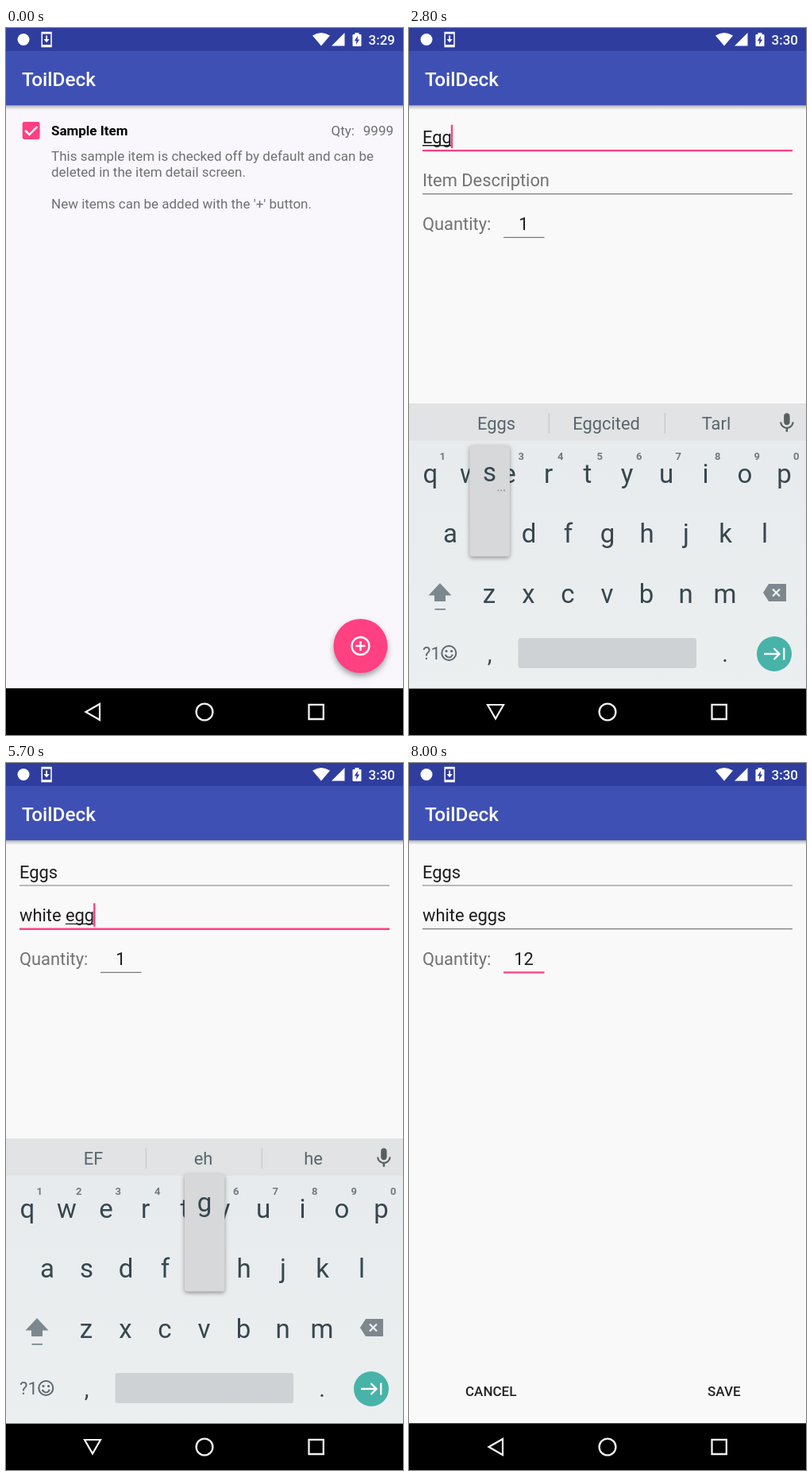
Animation of 500x889 px, one loop 8200 ms. Source, as an HTML page with a canvas:

```html
<!DOCTYPE html>
<html lang="en">
<head>
<meta charset="utf-8">
<title>Add an item</title>
<style>
  html, body { margin: 0; width: 100%; height: 100%; overflow: hidden; background: #000; }
  canvas { display: block; width: 100vw; height: 100vh; }
</style>
</head>
<body>
<canvas id="stage" width="500" height="889"></canvas>
<script>
const W = 500, H = 889, LOOP = 8200, STEP = 100;
const NAV_Y = 830.5, KEYS_Y = 472;
const PINK = '#ff4081', INK = '#37474f', MUTED = '#7c888e', TEAL = '#48b3a9';
const DP = 1.2153, BODY = 18 * DP, SMALL = 14 * DP;

const stage = document.getElementById('stage').getContext('2d');
const buffer = document.createElement('canvas');
buffer.width = W;
buffer.height = H;
const layer = buffer.getContext('2d');
let g = stage;

// Each key pops up at its time, commits 100 ms later and clears after 200 ms.
const HOLD = 100;
const NAME = { text: 'Eggs', at: [2100, 2300, 2500, 2800] };
const NOTE = { text: 'white eggs', at: [3700, 3900, 4100, 4300, 4600, 4900, 5100, 5400, 5600, 5900] };
const ROWS = [
  { keys: 'qwertyuiop', x: 27, y: 572 },
  { keys: 'asdfghjkl', x: 52, y: 647 },
  { keys: 'zxcvbnm', x: 101, y: 723 }
];
const GAP = 49.5;
const HINTS = [
  [0, 'the', 'I', 'thanks'],
  [2200, 'EF', 'Eh', 'He'],
  [2700, 'Eggs', 'Eggcited', 'Tarl'],
  [3400, 'the', 'I', 'thanks'],
  [3800, 'with', 'w', 'was'],
  [4000, 'what', 'why', 'who'],
  [4500, 'what', 'Whit', 'White'],
  [4800, 'White', 'white', 'whites'],
  [5000, 'house', 'and', 'wedding'],
  [5300, 'EF', 'eh', 'he'],
  [5800, 'Eggs', 'egg', 'eggs'],
  [6300, '', '', '']
];
const MIC = new Path2D('M12 14c1.66 0 3-1.34 3-3V5c0-1.66-1.34-3-3-3S9 3.34 9 5v6c0 1.66 1.34 3 3 3zm5.3-3c0 3-2.54 5.1-5.3 5.1S6.7 14 6.7 11H5c0 3.41 2.72 6.23 6 6.72V21h2v-3.28c3.28-.48 6-3.3 6-6.72h-1.7z');

const clamp = v => Math.max(0, Math.min(1, v));
const span = (t, a, b) => clamp((t - a) / (b - a));
const within = (t, a, b) => t >= a && t < b;
const typed = (field, t) => field.text.slice(0, field.at.filter(a => t >= a + HOLD).length);

function text(str, x, y, size, color, align = 'left', weight = 400) {
  g.font = `${weight} ${size}px Roboto, sans-serif`;
  g.textAlign = align;
  g.fillStyle = color;
  g.fillText(str, x, y);
  return g.measureText(str).width;
}

function rect(x, y, w, h, color, r = 0) {
  g.fillStyle = color;
  g.beginPath();
  g.roundRect(x, y, w, h, r);
  g.fill();
}

function disc(x, y, r, color) {
  g.fillStyle = color;
  g.beginPath();
  g.arc(x, y, r, 0, 7);
  g.fill();
}

function ring(x, y, r, color, width) {
  g.strokeStyle = color;
  g.lineWidth = width;
  g.beginPath();
  g.arc(x, y, r, 0, 7);
  g.stroke();
}

function trace(points, closed) {
  g.beginPath();
  for (let i = 0; i < points.length; i += 2) g.lineTo(points[i], points[i + 1]);
  if (closed) g.closePath();
}

function shape(points, color) {
  trace(points, true);
  g.fillStyle = color;
  g.fill();
}

function stroke(points, color, width, closed = false) {
  trace(points, closed);
  g.strokeStyle = color;
  g.lineWidth = width;
  g.stroke();
}

function shadowed(blur, dy, alpha, draw) {
  g.save();
  g.shadowColor = `rgba(0,0,0,${alpha})`;
  g.shadowBlur = blur;
  g.shadowOffsetY = dy;
  draw();
  g.restore();
}

function group(alpha, dy, draw) {
  layer.clearRect(0, 0, W, H);
  g = layer;
  draw();
  g = stage;
  g.globalAlpha = alpha;
  g.drawImage(buffer, 0, dy);
  g.globalAlpha = 1;
}

function statusBar(t) {
  const bar = '#2f3e9e';
  rect(0, 0, W, 29, bar);
  disc(22, 14.5, 7.5, '#fff');
  stroke([45.2, 5.5, 57, 5.5, 57, 23.5, 45.2, 23.5], '#fff', 1.5, true);
  rect(45, 5, 12, 2.5, '#fff');
  rect(45, 21, 12, 2.5, '#fff');
  rect(50.2, 9.5, 1.8, 5, '#fff');
  shape([47.5, 14, 54.7, 14, 51.1, 18.3], '#fff');

  g.fillStyle = '#fff';
  g.beginPath();
  g.moveTo(397, 22.5);
  g.lineTo(386, 9.5);
  g.quadraticCurveTo(397, 2.5, 408, 9.5);
  g.fill();
  shape([426.5, 6, 426.5, 22.5, 410, 22.5], '#fff');
  rect(436.5, 8, 11, 15, '#fff', 1);
  rect(439.5, 6, 5, 3, '#fff');
  shape([443.2, 9.5, 438.8, 16.2, 441.4, 16.2, 440.8, 21, 445.2, 14.4, 442.6, 14.4], bar);
  text(t < 500 ? '3:29' : '3:30', 490, 21, SMALL, '#fff', 'right', 500);
}

function appBar() {
  const fade = g.createLinearGradient(0, 97, 0, 103);
  fade.addColorStop(0, 'rgba(0,0,0,.28)');
  fade.addColorStop(1, 'rgba(0,0,0,0)');
  rect(0, 97, W, 6, fade);
  rect(0, 29, W, 68.2, '#3f50b5');
  text('ToilDeck', 20, 72.5, 20 * DP, '#fff', 'left', 500);
}

function listScreen(t) {
  const grey = '#6d7072';
  rect(0, 0, W, NAV_Y, '#f9f7fb');
  appBar();
  rect(20.7, 118, 21.9, 21.9, PINK, 2.4);
  stroke([24.2, 128.8, 29.4, 134, 39.4, 124], '#fff', 2.4);
  text('Sample Item', 57, 135, SMALL, '#000', 'left', 700);
  text('Qty:', 409.5, 135, SMALL, grey);
  text('9999', 488, 135, SMALL, grey, 'right');
  text('This sample item is checked off by default and can be', 57, 167, SMALL, grey);
  text('deleted in the item detail screen.', 57, 187, SMALL, grey);
  text("New items can be added with the '+' button.", 57, 226.5, SMALL, grey);

  const press = span(t, 0, 400);
  shadowed(7 + 5 * press, 4 + 2 * press, .36, () => disc(446.5, 777, 34, PINK));
  if (press) disc(446.5, 777, 34 * press, 'rgba(255,255,255,.22)');
  ring(446.5, 777, 11, '#fff', 2.4);
  stroke([440.5, 777, 452.5, 777], '#fff', 2.4);
  stroke([446.5, 771, 446.5, 783], '#fff', 2.4);
}

function underline(x, y, w, focused) {
  if (focused) rect(x, y - .6, w, 2.4, PINK);
  else rect(x, y - .1, w, 1.2, '#7b7b7b');
}

function field(value, hint, base, focused, composing) {
  underline(17, base + 8.8, 466, focused);
  const w = text(value || hint, 17, base, BODY, value ? '#1c1c1c' : '#727272');
  if (!focused) return;
  const end = value ? 17 + w : 17.5;
  const word = value.slice(value.lastIndexOf(' ') + 1);
  if (composing && word) rect(end - g.measureText(word).width, base + 2.4, g.measureText(word).width, 1.3, '#222');
  rect(end - 1, base - 23, 2.4, 29.5, PINK);
}

function formScreen(t) {
  rect(0, 0, W, NAV_Y, '#f9f9f9');
  appBar();
  field(typed(NAME, t), 'Item Name', 144.7, t < 3400, t < 3200);
  field(typed(NOTE, t), 'Item Description', 199.3, within(t, 3400, 6300), true);

  const active = t >= 6300, count = t < 7400 ? '1' : '12';
  text('Quantity:', 17, 254, BODY, '#727272');
  underline(119, 262.8, 51.5, active);
  const w = text(count, 144.5, 254, BODY, '#1c1c1c', 'center');
  if (active && t < 7900) rect(144.5 + w / 2 - .6, 231, 2.4, 31, PINK);
  if (active && t < 7400) {
    disc(151, 277, 12.2, PINK);
    shape([151, 262.5, 160.5, 270, 141.5, 270], PINK);
  }
  text('CANCEL', 71, 796, SMALL, '#222', 'left', 500);
  text('SAVE', 376, 796, SMALL, '#222', 'left', 500);
}

function backspace() {
  shape([446, 710, 453, 699, 475, 699, 475, 721, 453, 721], MUTED);
  stroke([458, 705.5, 467, 714.5], '#eceff0', 2.3);
  stroke([467, 705.5, 458, 714.5], '#eceff0', 2.3);
}

function letters(t) {
  const upper = within(t, 1900, 2200);
  for (const { keys, x, y } of ROWS)
    [...keys].forEach((k, i) => text(upper ? k.toUpperCase() : k, x + i * GAP, y, 33, INK, 'center'));
  for (let i = 0; i < 10; i++)
    text(String((i + 1) % 10), 42.3 + i * GAP, 542.5, 13, '#6f7b80', 'center', 700);

  const arrow = upper ? INK : MUTED;
  shape([39, 698, 53.5, 713.5, 46, 713.5, 46, 721, 32, 721, 32, 713.5, 24.5, 713.5], arrow);
  rect(32.5, 730, 13.5, 1.8, arrow);
  backspace();

  text('?1', 17, 794, 22, '#5c686e');
  ring(50.3, 786, 9, '#5c686e', 2);
  disc(47, 783.5, 1.6, '#5c686e');
  disc(53.6, 783.5, 1.6, '#5c686e');
  g.beginPath();
  g.arc(50.3, 786.5, 4.8, .3, Math.PI - .3);
  g.stroke();
  text(',', 101.5, 797, 29, INK, 'center');
  text('.', 398, 797, 29, INK, 'center');
  rect(137.5, 767, 224.5, 38, within(t, 4900, 5100) ? '#b9bfc2' : '#cfd2d4', 3);

  disc(460, 787, 22, within(t, 3200, 3400) ? '#35958c' : TEAL);
  stroke([447, 787, 466, 787], '#fff', 2.4);
  stroke([459.5, 780, 466.5, 787, 459.5, 794], '#fff', 2.4);
  rect(471, 779.5, 2.4, 15, '#fff');
}

function digits(t) {
  if (within(t, 7300, 7500)) rect(129, 528, 112, 68, '#d0d4d6', 3);
  '123456789'.split('').forEach((d, i) =>
    text(d, 68 + i % 3 * 117, 572 + Math.floor(i / 3) * 75.3, 33, INK, 'center'));
  text('0', 185, 797, 33, INK, 'center');
  text(',', 68, 797, 29, INK, 'center');
  text('.', 302, 797, 29, INK, 'center');
  text('-', 460, 570, 33, INK, 'center');
  stroke([450, 632, 450, 639, 470, 639, 470, 632], MUTED, 2.4);
  backspace();
  disc(460, 787, 22, TEAL);
  stroke([450.5, 787.5, 457, 794, 470, 781], '#fff', 2.5);
}

function keyboard(t) {
  const shade = g.createLinearGradient(0, 519, 0, NAV_Y);
  shade.addColorStop(0, '#e8ebed');
  shade.addColorStop(1, '#eceff0');
  rect(0, KEYS_Y, W, NAV_Y - KEYS_Y, shade);
  rect(0, KEYS_Y, W, 47, '#e1e3e4');
  const hints = HINTS.filter(h => t >= h[0]).pop();
  hints.slice(1).forEach((s, i) => text(s, 110 + i * 138.5, 504.5, BODY, '#59666c', 'center'));
  if (hints[1]) {
    rect(175.8, 484, 1.1, 26, '#c3c7c9');
    rect(321.8, 484, 1.1, 26, '#c3c7c9');
  }
  g.save();
  g.translate(461, 481.8);
  g.scale(1.24, 1.24);
  g.fillStyle = '#56605f';
  g.fill(MIC);
  g.restore();
  if (t < 6600) letters(t);
  else digits(t);
}

function popups(t) {
  for (const f of [NAME, NOTE]) f.at.forEach((a, i) => {
    const key = f.text[i];
    if (key === ' ' || !within(t, a, a + 2 * HOLD)) return;
    const row = ROWS.find(r => r.keys.includes(key.toLowerCase()));
    const x = row.x + row.keys.indexOf(key.toLowerCase()) * GAP;
    const plain = 'gw'.includes(key);
    const bottom = row.y + 17.5, h = plain ? 148 : 140;
    shadowed(5, 2, .38, () => rect(x - 25.2, bottom - h, 50.6, h, '#d6d8da', 4));
    text(key, x, bottom - h + (plain ? 47 : 45), 33, INK, 'center');
    if (!plain) for (let d = 0; d < 3; d++) rect(x + 10 + d * 3.8, bottom - h + 56, 1.8, 1.8, '#8c9498');
  });
}

function navIcons(t) {
  const c = '#f2f2f2';
  const back = within(t, 900, 7700) ? [99, 851, 119, 851, 109, 868.5] : [100.5, 860, 118, 850, 118, 870];
  stroke(back, c, 2.2, true);
  ring(250, 860, 10.4, c, 2.3);
  stroke([381.5, 850.8, 399.8, 850.8, 399.8, 869, 381.5, 869], c, 2.3, true);
}

function draw(t) {
  rect(0, 0, W, H, '#000');
  const open = span(t, 400, 800);
  if (open < 1) listScreen(t);
  if (open > 0) group(open, 70 * (1 - open) ** 2, () => formScreen(t));
  rect(0, NAV_Y, W, H - NAV_Y, '#000');

  const show = span(t, 1200, 1600), hide = span(t, 7500, 7800);
  if (show > 0 && hide < 1) {
    const alpha = (1 - (1 - show) ** 1.5) * (1 - hide);
    group(alpha, 89 * (1 - show) ** 2 + 40 * hide ** 2, () => keyboard(t));
    popups(t);
  }
  statusBar(t);
  navIcons(t);
}

function tick(now) {
  draw(Math.floor(now % LOOP / STEP) * STEP);
  requestAnimationFrame(tick);
}
requestAnimationFrame(tick);
</script>
</body>
</html>
```
